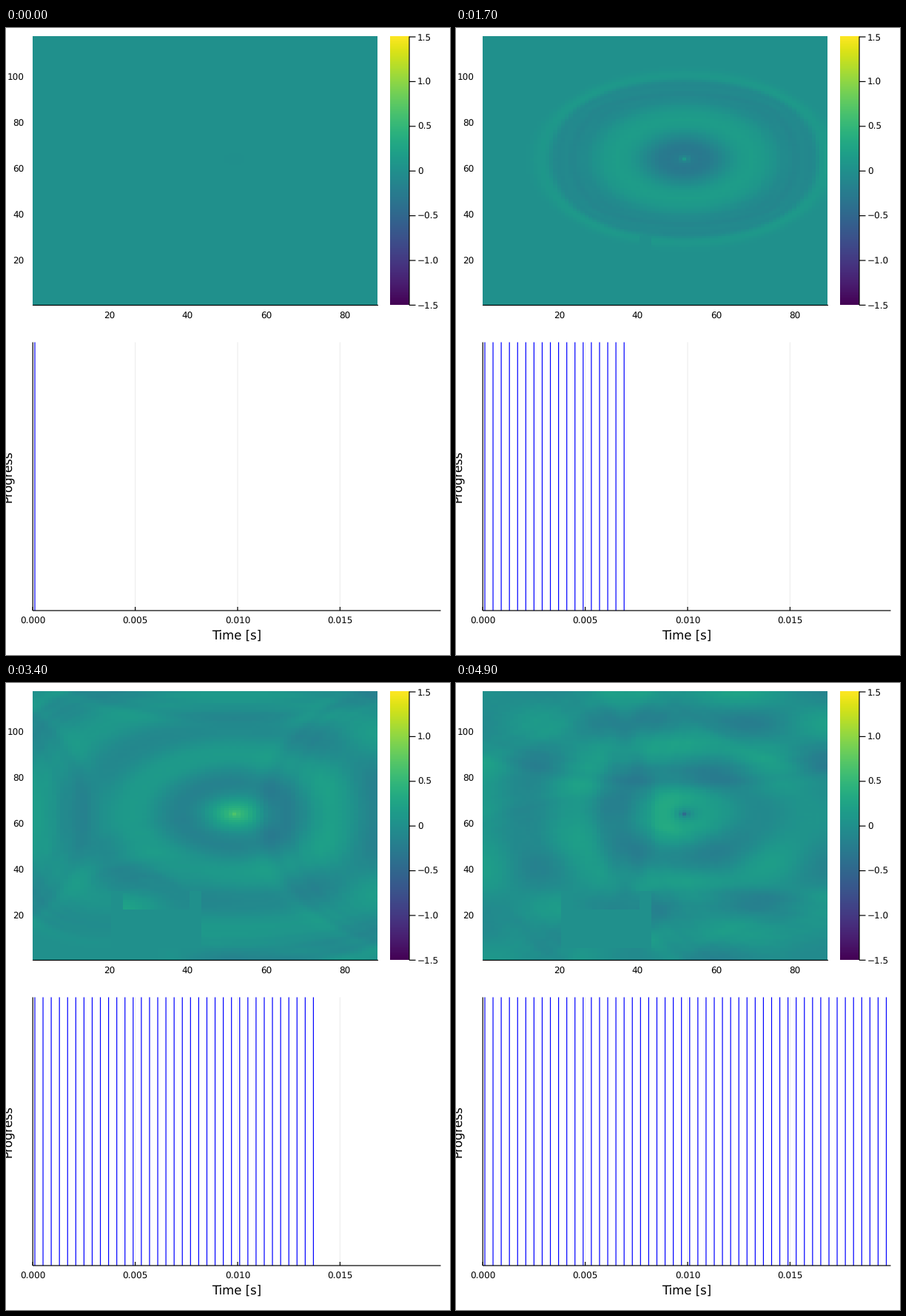
A matplotlib script for the animation above (5000 ms loop, 600 by 847 pixels).

```python
import matplotlib.pyplot as plt
import numpy as np
from matplotlib.animation import FuncAnimation

WIDTH, HEIGHT, DPI = 600, 847, 100
PX = 72 / DPI
FRAMES, INTERVAL = 50, 100
COLS, ROWS = 88, 117

# Times in ms, lengths in grid cells
DT = 0.1
STEPS_PER_FRAME = 4
COURANT = 0.49
PERIOD = 5.0
START = -12
RAMP = 0.8
DELAY = 0.3
SOURCE = (63, 51)
STRENGTH = 0.4
WALL_ADMITTANCE = 0.13


def shifted_sum(a):
    """Sum of the four neighbours, with zeros beyond the edge."""
    p = np.pad(a, 1)
    return p[2:, 1:-1] + p[:-2, 1:-1] + p[1:-1, 2:] + p[1:-1, :-2]


def make_room():
    air = np.ones((ROWS, COLS))
    air[5:30, 20:43] = 0
    air[22:30, 23:40] = 1
    return air


def flow(t):
    ramp = np.clip((t - START * DT) / RAMP, 0, 1)
    return -np.sin(np.pi / 2 * ramp) ** 2 * np.sin(2 * np.pi * (t - DELAY) / PERIOD)


def drive(t):
    """Pressure added by the source: the rate of change of its flow."""
    rate = (flow(t + DT / 2) - flow(t - DT / 2)) / DT
    return STRENGTH * rate * PERIOD / (2 * np.pi)


def simulate():
    air = make_room()
    neighbours = shifted_sum(air)
    loss = COURANT * WALL_ADMITTANCE * (4 - neighbours) / 2
    prev = np.zeros((ROWS, COLS))
    now = prev.copy()
    fields = []
    last = 1 + STEPS_PER_FRAME * (FRAMES - 1)
    for step in range(START, last + 1):
        t = step * DT
        lap = shifted_sum(now) - neighbours * now
        new = 2 * now - (1 - loss) * prev + COURANT ** 2 * lap
        new[SOURCE] += drive(t)
        new *= air / (1 + loss)
        prev, now = now, new
        if step > 0 and step % STEPS_PER_FRAME == 1:
            fields.append(now * (1 - np.exp(-t ** 2)))
    return fields


fields = simulate()

plt.rcParams["font.family"] = "DejaVu Sans"
plt.rcParams["text.hinting"] = "none"
fig = plt.figure(figsize=(WIDTH / DPI, HEIGHT / DPI), dpi=DPI, facecolor="white")
ax = fig.add_axes([0, 0, 1, 1])
ax.axis("off")


def line(x0, y0, x1, y1, color="black", width=1.2, z=4):
    ax.plot([x0, x1], [y0, y1], color=color, lw=width * PX, zorder=z,
            solid_capstyle="butt", snap=False)


def label(x, y, text, size=12, ha="center", **kw):
    ax.text(x, y, text, fontsize=size * PX, ha=ha, va="baseline", **kw)


def picture(data, left, right):
    return ax.imshow(data, extent=(left, right, 374.5, 11.5), origin="lower",
                     cmap="viridis", vmin=-1.5, vmax=1.5, aspect="auto",
                     interpolation="nearest", zorder=1)


# Wave field
heat = picture(fields[0], 36, 502)
line(36, 374.5, 503, 374.5)
for v in range(20, 101, 20):
    label(24.5, 314.5 - 3.1 * (v - 20) + 4.4, str(v), ha="right")
    if v < 100:
        label(139.5 + 5.3 * (v - 20), 392.4, str(v))

# Colour scale
picture(np.linspace(-1.5, 1.5, 256)[:, None], 519, 545)
line(545, 11.5, 545, 374.5)
for i in range(7):
    v = 1.5 - 0.5 * i
    y = 12 + 60.4 * i
    line(545, y, 553.5, y)
    text = "0" if v == 0 else f"{v:.1f}".replace("-", "\u2212")
    label(556, y + 4.4, text, ha="left")

# Progress chart
TOP, BASE, ZERO, PX_PER_MS = 424.5, 787, 36.2, 27.68
for i in range(4):
    x = ZERO + 5 * PX_PER_MS * i
    if i:
        line(x, TOP, x, BASE, "#eeeeee", z=2)
    line(x, BASE - 5, x, BASE)
    label(x, 805, f"{0.005 * i:.3f}")
line(ZERO, TOP, ZERO, BASE)
line(36, BASE, 587.5, BASE)
label(312, 827, "Time [s]", 16.5)
label(6.5, 606, "Progress", 16.5, rotation=90, rotation_mode="anchor")
marks = ax.vlines([], TOP, BASE, colors="blue", linewidths=1.2 * PX, zorder=3)
marks.set_snap(False)

ax.set_xlim(0, WIDTH)
ax.set_ylim(HEIGHT, 0)


def update(frame):
    heat.set_data(fields[frame])
    times = DT * (1 + STEPS_PER_FRAME * np.arange(frame + 1))
    marks.set_segments([[(x, TOP), (x, BASE)] for x in ZERO + PX_PER_MS * times])
    return heat, marks


anim = FuncAnimation(fig, update, frames=FRAMES, interval=INTERVAL,
                     repeat=True, repeat_delay=0)
plt.show()
```
